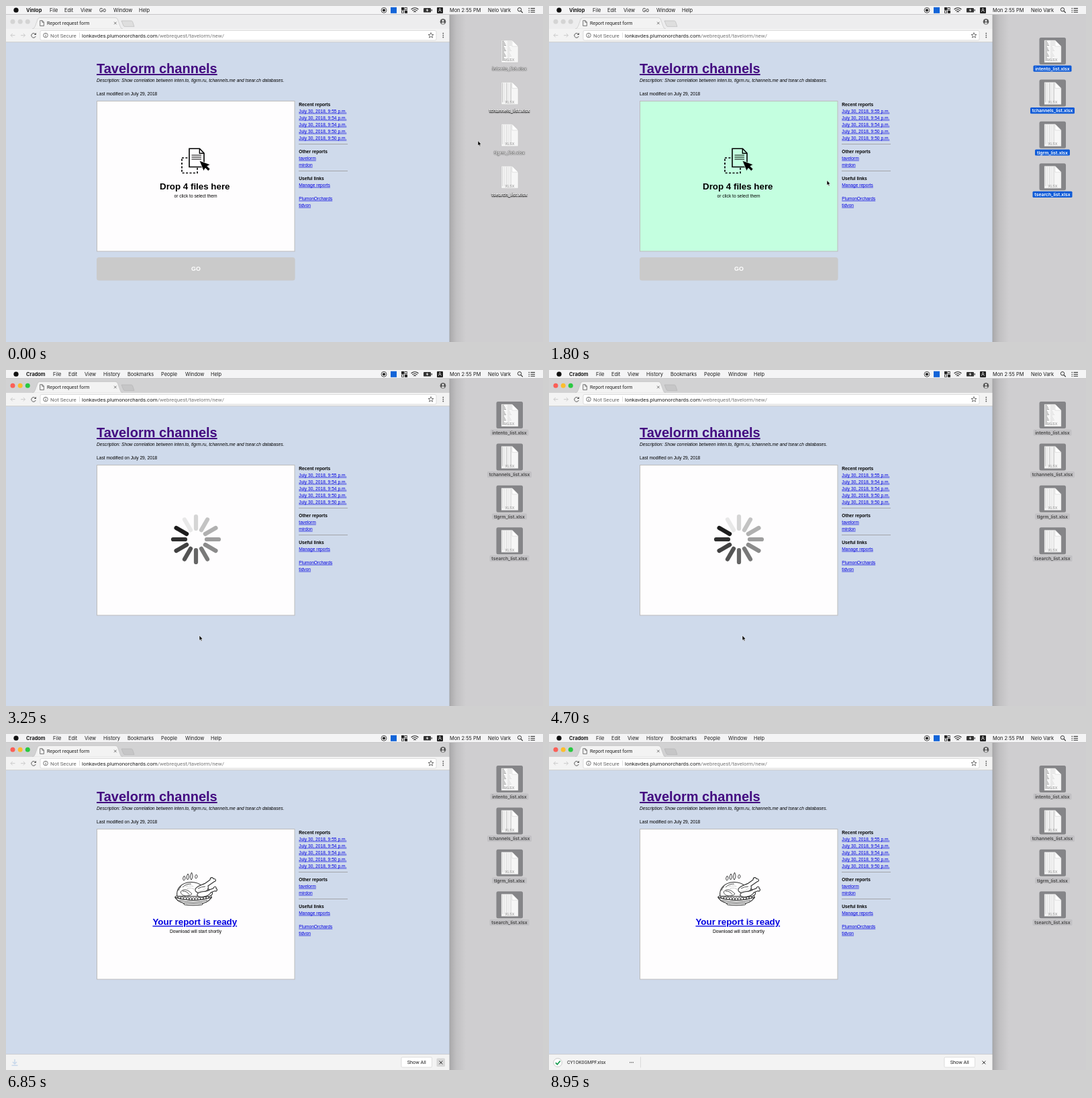
These frames come from a looping animation (800x500 px, 9000 ms). An HTML page:

```html
<!DOCTYPE html>
<html lang="en">
<head>
<meta charset="utf-8">
<title>Report request form</title>
<style>
html, body { margin: 0; width: 100%; height: 100%; overflow: hidden; background: #cfced0; }
svg { display: block; width: 800px; height: 500px; }
text { white-space: pre; }
.ui { font-family: Inter, sans-serif; font-size: 7.4px; fill: #1a1a1a; }
.tb { font-family: Roboto, sans-serif; font-size: 7.9px; fill: #222; }
.pg { font-family: "Liberation Sans", Arial, sans-serif; font-size: 6.67px; fill: #000; }
.b { font-weight: 700; }
.link { fill: #0000e0; text-decoration: underline; }
.mid { text-anchor: middle; }
.end { text-anchor: end; }
</style>
</head>
<body>
<svg id="stage" viewBox="0 0 800 500" xmlns="http://www.w3.org/2000/svg"></svg>
<script>
const LOOP = 9000;
const text = (x, y, s, cls, extra = "") => `<text x="${x}" y="${y}" class="${cls}" ${extra}>${s}</text>`;
const rect = (x, y, w, h, fill, extra = "") => `<rect x="${x}" y="${y}" width="${w}" height="${h}" fill="${fill}" ${extra}/>`;
const line = (d, color, w = 1, extra = "") => `<path d="${d}" fill="none" stroke="${color}" stroke-width="${w}" ${extra}/>`;
const shape = (d, fill, extra = "") => `<path d="${d}" fill="${fill}" ${extra}/>`;
const dot = (x, y, r, fill, extra = "") => `<circle cx="${x}" cy="${y}" r="${r}" fill="${fill}" ${extra}/>`;
const group = (id, body, extra = "") => `<g id="${id}" ${extra}>${body}</g>`;

const files = ["intento_list.xlsx", "tchannels_list.xlsx", "tlgrm_list.xlsx", "tsearch_list.xlsx"];
const labelW = [57, 66, 52, 59];
const rowY = i => 47 + 62.4 * i;

function filePage(i) {
  const y = rowY(i);
  let s = shape(`M738 ${y + 4}H754L763 ${y + 13}V${y + 37}H738Z`, "#f6f6f6", 'stroke="#bbb" stroke-width=".4"');
  if (i === 0) {
    for (let k = 0; k < 15; k++) {
      const w = 3 + (k * 5) % 4;
      s += rect(739, y + 5 + k * 2, w, .8, "#888") + rect(747, y + 5 + k * 2, k < 4 ? 6 : w, .6, "#ccc");
    }
  } else {
    for (let k = 0; k < 5; k++) s += rect(739 + k * 3.1, y + 5, 1.5, 29, k % 2 ? "#e6e6e6" : i === 1 ? "#cecece" : "#dedede");
  }
  s += shape(`M754 ${y + 4}L763 ${y + 13}H754Z`, "#fff", 'stroke="#bbb" stroke-width=".4"');
  return s + text(750.5, y + 35.4, "XLSX", "ui mid", 'style="font-size:5.4px;fill:#8d8d8d"');
}

function fileItem(i) {
  const y = rowY(i), w = labelW[i];
  return rect(730.5, y, 39.5, 40, "#858588", `rx="2.5" id="plate${i}"`) + filePage(i) +
    rect(750 - w / 2, y + 41.6, w, 9.2, "#0f5bd7", `rx="1.5" id="tag${i}"`) +
    text(750, y + 48.8, files[i], "ui mid", `id="name${i}" style="font-size:6.8px;font-weight:600"`);
}

const ghost = () => files.map((f, i) => filePage(i) +
  text(750, rowY(i) + 48.8, f, "ui mid", 'style="font-size:6.8px;font-weight:600"')).join("");

const menu = (id, names, xs) => group(id, names.map((n, i) =>
  text(xs[i], 9.2, n, i ? "ui" : "ui b")).join(""));

function menuBar() {
  return rect(0, 0, 800, 12.5, "#f4f4f5") + rect(0, 12.2, 800, .6, "#b8b8ba") +
    dot(15, 6.2, 3.6, "#111") +
    menu("menuA", ["Vinlop", "File", "Edit", "View", "Go", "Window", "Help"], [30, 65, 87, 111, 139, 160, 198]) +
    menu("menuB", ["Cradom", "File", "Edit", "View", "History", "Bookmarks", "People", "Window", "Help"],
      [30, 70, 93, 117, 145, 181, 231, 267, 305]) +
    dot(563, 6.3, 3.9, "none", 'stroke="#222" stroke-width=".8"') + dot(563, 6.3, 2.1, "#222") +
    rect(573, 1.8, 9, 9, "#1264d8") +
    rect(589, 2, 4, 4, "#222") + rect(594, 2.5, 3.2, 3.2, "none", 'stroke="#222" stroke-width=".8"') +
    rect(589.4, 7, 3.2, 3.2, "none", 'stroke="#222" stroke-width=".8"') + rect(594, 6.8, 4, 4, "#222") +
    line("M603.6 5Q609 .5 614.4 5M605.4 7Q609 4 612.6 7M607.3 8.8Q609 7.4 610.7 8.8", "#222", 1.1) +
    rect(622, 3, 11, 6.6, "#333", 'rx="1.2"') + rect(633.6, 5, 1.2, 2.6, "#333") +
    shape("M628 3.6L625.7 6.7H627.5L627 9L629.4 5.8H627.6Z", "#fff") +
    rect(642, 2, 9, 9, "#222", 'rx="1"') + text(646.5, 9, "A", "ui mid", 'style="fill:#fff;font-size:7px"') +
    text(661, 9.2, "Mon 2:55 PM", "ui") + text(718, 9.2, "Nelo Vark", "ui") +
    dot(765, 5.3, 2.7, "none", 'stroke="#222" stroke-width=".9"') + line("M767 7.3L769.8 10.2", "#222", 1.1) +
    line("M778.5 3.5H780M781.5 3.5H788M778.5 6.3H780M781.5 6.3H788M778.5 9.1H780M781.5 9.1H788", "#222", 1);
}

function browserBar() {
  return rect(0, 13, 661, 21, "#d2d2d3", 'id="strip"') +
    [10, 21.2, 32.3].map((x, i) => dot(x, 23.3, 3.5, "#ccc", `id="light${i}"`)).join("") +
    shape("M39 34.2Q42 34 43.5 30L47 20Q48 17.4 50.5 17.4H163Q165.5 17.4 166.4 20L170 30Q171 34 174 34.2Z", "#f3f3f3", 'stroke="#b5b5b5" stroke-width=".5"') +
    shape("M172 22H186.5Q188 22 188.6 23.5L191 30.6H177Q175.4 30.6 174.8 29Z", "#c9c9c9", 'id="plus" stroke="#aaa" stroke-width=".5"') +
    line("M50.7 21.7H54.2L56.4 24V29.6H50.7ZM54 21.7V24.2H56.4", "#555", .8) +
    text(61, 28, "Report request form", "tb", 'style="font-size:7.1px"') +
    line("M161 23.7L164.6 27.3M164.6 23.7L161 27.3", "#555", .8) +
    dot(651, 23.3, 4.3, "#5a5a5a") + dot(651, 22, 1.4, "#eee") + shape("M648.4 25.7Q651 22.7 653.6 25.7Q651 27.7 648.4 25.7Z", "#eee") +
    rect(0, 34, 661, 20, "#f3f3f3") + rect(0, 53.4, 661, .7, "#bfbfbf") +
    line("M13.5 43.7H7M9.7 41L7 43.7L9.7 46.4M22 43.7H28.5M25.8 41L28.5 43.7L25.8 46.4", "#cbcbcb", 1) +
    line("M43.8 42A3.3 3.3 0 1 0 44.2 45", "#555", 1) + shape("M44.9 39.8V43H41.7Z", "#555") +
    rect(51, 36.5, 590, 14.5, "#fff", 'rx="2" stroke="#c9c9c9" stroke-width=".6"') +
    dot(59, 43.6, 3.3, "none", 'stroke="#555" stroke-width=".8"') + rect(58.6, 43.2, .9, 2.4, "#555") + rect(58.6, 41.5, .9, .9, "#555") +
    text(66, 46.5, "Not Secure", "tb", 'style="fill:#666"') + rect(109, 39.5, .6, 8, "#ccc") +
    `<text x="113" y="46.5" class="tb">lonkavdes.plumonorchards.com<tspan fill="#777">/webrequest/tavelorm/new/</tspan></text>` +
    line("M633 39.6L634.1 42.4L637 42.5L634.7 44.3L635.5 47.2L633 45.5L630.5 47.2L631.3 44.3L629 42.5L631.9 42.4Z", "#555", .8) +
    [40.7, 43.6, 46.5].map(y => dot(651.3, y, .9, "#555")).join("");
}

function sidebar() {
  const times = ["9:55", "9:54", "9:54", "9:50", "9:50"];
  const link = (y, s) => text(436.3, y, s, "pg link"), head = (y, s) => text(436.3, y, s, "pg b");
  return head(148.7, "Recent reports") + times.map((t, i) => link(158.7 + 10 * i, `July 30, 2018, ${t} p.m.`)).join("") +
    rect(436, 205.2, 73, .8, "#999") + head(218.7, "Other reports") + link(228.7, "tavelorm") + link(238.7, "mirdon") +
    rect(436, 245.2, 73, .8, "#999") + head(258.7, "Useful links") + link(268.7, "Manage reports") +
    link(288.7, "PlumonOrchards") + link(298.7, "tidvon");
}

function dropHint() {
  return rect(262, 226, 23, 22.5, "none", 'stroke="#000" stroke-width="1.7" stroke-dasharray="3 2.4"') +
    shape("M273 212.3H288.5L295 219V239.5H273Z", "var(--zone)", 'stroke="#000" stroke-width="1.6"') +
    line("M288.3 212.5V219.2H295", "#000", 1.4) + line("M276.5 222H291M276.5 225H291M276.5 228H291", "#000", 1.2) +
    shape("M288 230L304.3 236L299.8 238.4L304 242.6L301.2 245.4L297 241.2L294.3 245.5Z", "#000", 'stroke="var(--zone)" stroke-width=".8"') +
    text(281.3, 273, "Drop 4 files here", "pg b mid", 'style="font-size:13.33px"') +
    text(282.5, 284.5, "or click to select them", "pg mid");
}

function spokes() {
  let s = "";
  for (let i = 0; i < 12; i++)
    s += `<line id="spoke${i}" x1="283" y1="236" x2="283" y2="218" stroke-width="6.2" stroke-linecap="round" transform="rotate(${30 * i} 283 252)"/>`;
  return s;
}

function report() {
  const c = "#2a2a2a", edge = `stroke="${c}" stroke-width="1.1"`;
  const flame = (x, y, h) => line(`M${x} ${y}q-3 ${-h * .4} .5 ${-h}q3.4 ${h * .6} -.5 ${h}Z`, c, .9);
  let s = flame(265, 218, 7) + flame(270.5, 217, 9) + flame(276, 217, 11) + flame(283, 215, 6);
  s += shape("M255 241C253 231 261 221 275 220.5C285 220 290 224 293 227C299 227 301 231 306 234C309 237 307 241 302 242Z", "#fff", edge) +
    shape("M282 231C284 226 292 225 297 222L304 217C304 213 308 212.5 309 215.5C313 215 313.5 219 310.5 219.5L301 226C303 232 295 238 289 237C284 236 281 234 282 231Z", "#fff", edge) +
    shape("M285 238C289 233 297 236 303 232L309 229.5C310 226 314 227 313 230C316 231 314 235 311 233.5L305 236C302 242 291 244 285 241Z", "#fff", edge) +
    line("M260 235C265 229 272 232 277 238C271 243 262 242 260 235M263 234Q269 233 273 239M263 228Q268 223 276 223M286 230Q291 227 297 227M257 233Q258 229 261 227", c, .8) +
    line("M268 227Q274 225 280 227M270 230Q275 228 280 231M287 234Q293 234 297 230", c, .7, 'stroke-dasharray=".8 1.6"');
  for (let i = 0; i < 13; i++)
    s += dot(254 + i * 4.2, 243 + Math.sin(i / 12 * Math.PI) * 2.5, 2, "#fff", `stroke="${c}" stroke-width=".9"`);
  s += shape("M252 243Q279 252 306 243Q302 250 294 251.5L292 254Q279 256 266 254L264 251.5Q255 249 252 243Z", "#fff", edge) +
    line("M258 247.5Q279 253 300 247.5M265 251.5Q279 253.5 293 251.5", c, .8);
  return s + text(281.3, 284.3, "Your report is ready", "pg b mid link", 'style="font-size:13.33px"') +
    text(282.5, 295.5, "Download will start shortly", "pg mid");
}

function sheet() {
  const small = 'style="font-size:7.1px"';
  const label = (x, y, s) => text(x, y, s, "ui end", small);
  const box = (x, y, w, h = 11.5, r = 0) => rect(x, y, w, h, "#fff", `rx="${r}" stroke="#c2c2c2" stroke-width=".6"`);
  const arrows = y => line(`M402.5 ${y - 1}l1.7 -2l1.7 2M402.5 ${y + 1}l1.7 2l1.7 -2`, "#333", .9);
  return rect(234, 30, 194, 128, "#ececec", 'filter="url(#soft)"') + rect(234, 30, 194, 128, "#ececec", 'stroke="#bbb" stroke-width=".5"') +
    rect(234, 104, 194, 34, "#dfdfdf") + rect(234, 103.8, 194, .5, "#ccc") + rect(234, 137.8, 194, .5, "#ccc") +
    label(267, 63, "Save As:") + box(270, 54.5, 139) + rect(272, 55.5, 48.5, 9.5, "#d0d0d0") +
    text(272.5, 63.1, "CY1OK0GMPF.xlsx", "ui", small) + box(413, 54.5, 10.5, 11, 2) + line("M416 59.2L418.2 61.4L420.4 59.2", "#333", .9) +
    label(267, 79.7, "Tags:") + box(270, 71, 139) +
    label(267, 96.7, "Where:") + box(270, 88, 139, 11.5, 2) +
    shape("M275 90.3H278.5L279.5 91.3H284V97.3H275Z", "#4aa4e6") + line("M279.5 92.5V95.5M278 94.3L279.5 95.8L281 94.3", "#1d66a8", .8) +
    text(286, 96.6, "Downloads", "ui", small) + arrows(93.8) +
    label(277, 124.3, "Format:") + box(281, 116, 129, 11.5, 2) + text(286, 124.5, "Office Open XML spreadsheet", "ui", small) + arrows(121.8) +
    box(333, 142, 43, 11.5, 2) + text(354.3, 150.3, "Cancel", "ui mid", small) +
    box(381, 142, 43, 11.5, 2) + text(402, 150.3, "Save", "ui mid", small);
}

function shelf() {
  return rect(0, 476.5, 661, 24, "#f3f3f3") + rect(0, 476.3, 661, .7, "#c4c4c4") +
    rect(589, 481, 45.5, 15, "#fff", 'rx="1.5" stroke="#ccc" stroke-width=".6"') + text(611.7, 491.3, "Show All", "tb mid", 'style="font-size:7.3px"') +
    rect(641.5, 482.5, 12.5, 12.5, "#d8d8d8", 'id="hover" rx="1.5"') +
    line("M645.5 486.5L650.3 491.3M650.3 486.5L645.5 491.3", "#333", 1) +
    group("arrow", line("M13 484V490.5M10 488L13 491L16 488M8.5 493.2H17.5", "#7aa7dc", 1.5)) +
    line("", "#4285f4", 1.2, 'id="ring"') +
    group("check", dot(13, 489, 6.3, "#fff", 'stroke="#bbb" stroke-width=".8"') + line("M9.9 489.2L12.3 491.7L16.7 486.5", "#189b50", 1.7)) +
    group("item", text(27, 491.3, "CY1OK0GMPF.xlsx", "tb", 'style="font-size:6.9px"') +
      [120.7, 123, 125.3].map(x => dot(x, 488.8, .75, "#555")).join("") + rect(136, 480.5, .6, 16, "#ccc"));
}

const stage = document.getElementById("stage");
stage.innerHTML = `<defs>
  <linearGradient id="shade"><stop offset="0" stop-color="#000" stop-opacity=".18"/><stop offset=".4" stop-color="#000" stop-opacity=".07"/><stop offset="1" stop-color="#000" stop-opacity="0"/></linearGradient>
  <filter id="soft" x="-20%" y="-20%" width="140%" height="150%"><feDropShadow dx="0" dy="3" stdDeviation="4" flood-opacity=".45"/></filter>
  <clipPath id="below"><rect x="0" y="54" width="661" height="446"/></clipPath></defs>` +
  rect(0, 0, 800, 500, "#cfced0") + files.map((f, i) => fileItem(i)).join("") +
  rect(661, 13, 24, 487, "url(#shade)") + rect(0, 54, 661, 446, "#cfdaeb") + browserBar() +
  text(135, 100, "Tavelorm channels", "pg b", 'style="font-size:20px;fill:#430a80;text-decoration:underline"') +
  text(135, 113, "Description: Show correlation between inten.to, tlgrm.ru, tchannels.me and tsear.ch databases.", "pg", 'font-style="italic"') +
  text(135, 132.7, "Last modified on July 29, 2018", "pg") + sidebar() +
  rect(135.5, 141.5, 294.5, 223.5, "var(--zone)", 'stroke="#bcbcbc" stroke-width="1"') +
  group("hint", dropHint() + rect(135, 374, 295.6, 34.6, "#cacaca", 'rx="3.5"') +
    text(283, 394.3, "GO", "pg b mid", 'style="font-size:8.9px;fill:#fff"')) +
  group("spin", spokes()) + group("done", report()) +
  `<g clip-path="url(#below)">${group("sheet", sheet())}</g>` + group("shelf", shelf()) +
  rect(660.6, 13, .6, 487, "#9a9a9c") + menuBar() +
  rect(0, 0, 0, 0, "#fff", 'id="band" fill-opacity=".22" stroke="#fff" stroke-width=".6"') +
  group("ghost", ghost(), 'opacity=".5"') +
  group("cursor", shape("M0 0V7.4L1.7 5.9L2.9 8.6L4.1 8.1L3 5.4H5.2Z", "#000", 'stroke="#fff" stroke-width=".6"'));

const el = {};
stage.querySelectorAll("[id]").forEach(n => el[n.id] = n);
const show = (id, on) => el[id].style.display = on ? "" : "none";
const set = (id, k, v) => el[id].setAttribute(k, v);
const ramp = (t, a, b) => Math.max(0, Math.min(1, (t - a) / (b - a)));
const ease = p => p * p * (3 - 2 * p);

// time, x, y
const path = [[50, 703, 200.5], [230, 707, 270], [300, 707, 270], [700, 772, 62], [950, 748, 139],
  [1050, 748, 139], [1700, 414, 259.4], [1950, 414, 259.4], [2350, 288, 395]];

function pointer(t) {
  let i = 0;
  while (i < path.length - 2 && t > path[i + 1][0]) i++;
  const [a, x, y] = path[i], [b, u, v] = path[i + 1], p = ease(ramp(t, a, b));
  return [x + (u - x) * p, y + (v - y) * p];
}

function draw(t) {
  const [x, y] = pointer(t), active = t >= 2450, sent = t >= 2600, ready = t >= 5450;
  set("cursor", "transform", `translate(${x} ${y})`);
  show("cursor", t < 6550);

  const banding = t >= 300 && t < 750;
  show("band", banding);
  if (banding) {
    set("band", "x", 707); set("band", "y", y);
    set("band", "width", Math.max(0, x - 707)); set("band", "height", Math.max(0, 270 - y));
  }
  files.forEach((f, i) => {
    const picked = t >= 750 || banding && y < rowY(i) + 48 && x > 750 - labelW[i] / 2;
    show("plate" + i, picked);
    show("tag" + i, picked);
    set("tag" + i, "fill", active ? "#c2c1c4" : "#0f5bd7");
    const name = el["name" + i].style;
    name.fill = active ? "#444" : "#fff";
    name.textShadow = picked ? "none" : "0 .5px 1.5px #000, 0 .5px 1px #333";
  });
  show("ghost", t >= 1050 && t < 1750);
  set("ghost", "transform", `translate(${x - 748} ${y - 139})`);
  stage.style.setProperty("--zone", t >= 1600 && !sent ? "#c4ffe0" : "#fefdfe");

  show("hint", !sent);
  show("spin", sent && !ready);
  show("done", ready);
  const head = 10 + Math.floor((Math.max(t, 2800) - 3250) * 12 / 1450 + .001);
  for (let i = 0; i < 12; i++) {
    const age = ((head - i) % 12 + 12) % 12, v = Math.round(28 + age * 18.5);
    set("spoke" + i, "stroke", `rgb(${v},${v},${v})`);
  }

  const drop = ease(ramp(t, 5990, 6250)) * (1 - ease(ramp(t, 6550, 6700)));
  show("sheet", drop > 0);
  set("sheet", "transform", `translate(0 ${-112 + 124 * drop})`);

  show("menuA", !active);
  show("menuB", active);
  set("strip", "fill", active ? "#d2d2d3" : "#ededee");
  set("plus", "fill", active ? "#c6c6c7" : "#dedede");
  // an open sheet disables the close button
  const closable = active && drop === 0;
  [closable, active, active].forEach((on, i) =>
    set("light" + i, "fill", on ? ["#fb5f57", "#fcbd2e", "#29c941"][i] : "#d4d4d4"));

  show("shelf", t >= 6750);
  set("shelf", "transform", `translate(0 ${24 * (1 - ease(ramp(t, 6700, 6850)))})`);
  show("hover", t < 7100);
  const complete = t >= 7500, loaded = ramp(t, 6950, 7500);
  show("arrow", !complete);
  set("arrow", "opacity", .35 + .65 * ramp(t, 6850, 7050));
  show("check", complete);
  set("check", "opacity", .65 + .35 * Math.cos((t - 8950) / 725 * 2 * Math.PI));
  set("item", "opacity", ramp(t, 6880, 7080));
  const a = loaded * 2 * Math.PI - .01;
  show("ring", loaded > 0 && !complete);
  set("ring", "d", `M13 482.5A6.5 6.5 0 ${loaded > .5 ? 1 : 0} 1 ${13 + 6.5 * Math.sin(a)} ${489 - 6.5 * Math.cos(a)}`);
}

const start = performance.now();
function tick(now) {
  draw(Math.max(0, now - start) % LOOP);
  requestAnimationFrame(tick);
}
draw(0);
requestAnimationFrame(tick);
</script>
</body>
</html>
```
